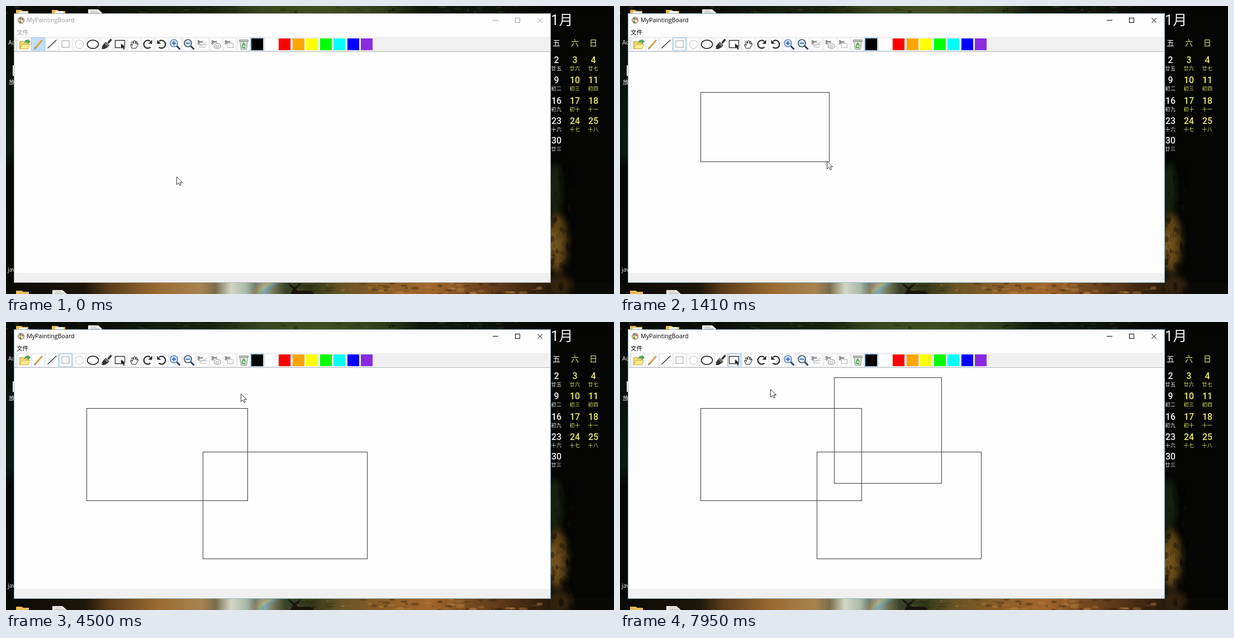
These frames come from a looping animation (1088 px wide and 515 px high, 8000 ms). An HTML page:

```html
<!DOCTYPE html>
<html lang="zh">
<head>
<meta charset="utf-8">
<title>MyPaintingBoard</title>
<style>
html, body { margin: 0; width: 100%; height: 100%; overflow: hidden; background: #060805; }
svg { display: block; width: 1088px; height: 515px; }
text { font-family: "Open Sans", "Noto Sans CJK SC", "Noto Sans CJK", sans-serif; }
.cal text { font-family: Roboto, "Noto Sans CJK SC", "Noto Sans CJK", sans-serif; font-weight: 500; text-anchor: middle; }
.cal .sub { letter-spacing: .5px; font-weight: 400; }
.line { fill: none; stroke: #3a3a3a; stroke-width: 1; shape-rendering: crispEdges; }
#chrome { color: #000; }
#chrome.idle { color: #999; }
</style>
</head>
<body>
<svg viewBox="0 0 1088 515">
  <defs>
    <linearGradient id="top">
      <stop offset="0" stop-color="#060805"/><stop offset=".17" stop-color="#0b0f07"/>
      <stop offset=".25" stop-color="#151d0b"/><stop offset=".34" stop-color="#1a220e"/>
      <stop offset=".42" stop-color="#38451e"/><stop offset=".52" stop-color="#424d22"/>
      <stop offset=".62" stop-color="#323c1a"/><stop offset=".68" stop-color="#12190b"/>
      <stop offset=".8" stop-color="#0d1208"/><stop offset=".9" stop-color="#040503"/>
    </linearGradient>
    <linearGradient id="ground">
      <stop offset="0" stop-color="#0a0a06"/><stop offset=".13" stop-color="#1d160a"/>
      <stop offset=".17" stop-color="#5c3d1b"/><stop offset=".25" stop-color="#9a6a31"/>
      <stop offset=".32" stop-color="#a98350"/><stop offset=".345" stop-color="#7a6d4c"/>
      <stop offset=".37" stop-color="#d3d7c5"/><stop offset=".395" stop-color="#a9b9a8"/>
      <stop offset=".41" stop-color="#70806d"/><stop offset=".425" stop-color="#91a7a3"/>
      <stop offset=".44" stop-color="#747758"/><stop offset=".46" stop-color="#384329"/>
      <stop offset=".5" stop-color="#303718"/><stop offset=".55" stop-color="#665326"/>
      <stop offset=".62" stop-color="#8a5d27"/><stop offset=".7" stop-color="#a2662c"/>
      <stop offset=".76" stop-color="#774a20"/><stop offset=".82" stop-color="#5a3718"/>
      <stop offset=".89" stop-color="#2c1c0c"/><stop offset=".94" stop-color="#080805"/>
    </linearGradient>
    <linearGradient id="side" x2="0" y2="1">
      <stop offset="0" stop-color="#060805"/><stop offset=".2" stop-color="#08100b"/>
      <stop offset=".5" stop-color="#0c1912"/><stop offset=".57" stop-color="#050705"/>
      <stop offset="1" stop-color="#070805"/>
    </linearGradient>
    <filter id="soft" x="-50%" y="-50%" width="200%" height="200%"><feGaussianBlur stdDeviation="6"/></filter>
    <filter id="glow" x="-50%" y="-50%" width="200%" height="200%"><feGaussianBlur stdDeviation="2"/></filter>
    <clipPath id="right"><path d="M975 0H1088V515H975Z"/></clipPath>
  </defs>

  <g id="desktop">
    <path fill="#050604" d="M0 0H1088V515H0Z"/>
    <path fill="url(#top)" d="M0 0H1088V14H0Z"/>
    <path fill="url(#side)" d="M0 0H15V515H0Z"/>
    <path fill="url(#ground)" d="M0 494H1088V515H0Z"/>
    <g clip-path="url(#right)"><g filter="url(#soft)">
      <ellipse cx="982" cy="328" rx="13" ry="48" fill="#18220e"/>
      <ellipse cx="986" cy="424" rx="19" ry="52" fill="#5d4319"/>
      <ellipse cx="980" cy="430" rx="8" ry="28" fill="#7d5a20"/>
      <ellipse cx="990" cy="500" rx="22" ry="20" fill="#33230f"/>
    </g></g>
    <g id="texture"></g>
    <g fill="none" stroke-width="4" opacity=".55" filter="url(#glow)">
      <path d="M442 515Q450 498 470 494" stroke="#d07850"/>
      <path d="M450 515Q460 500 478 494" stroke="#bccc59"/>
      <path d="M459 515Q467 504 486 494" stroke="#51a7d8"/>
    </g>
    <path fill="#1a150c" d="M509 515L514 506 507 500 504 495 511 499 516 503 521 500 528 495 525 501 519 506 522 509H540Q549 509 551 515Z"/>
    <g id="shortcuts">
      <path fill="#e7ba55" d="M18 7H27L30 9H40V14H18ZM82 7H92L95 9H106V14H82ZM18 509H28L31 511H41V515H18Z"/>
      <path fill="#f3f3ed" d="M23 10H38V14H23ZM88 9H103V14H88ZM147 6H165L172 12V14H147ZM83 508H101L109 515H83ZM12 106H15V125H12Z"/>
      <path stroke="#99a0a0" d="M151 9H162M151 12H167M87 511H99M87 514H105"/>
      <g fill="#eee" font-size="10.5"><text x="4" y="69">Ac</text><text x="5" y="140">放</text><text x="3" y="475">jav</text></g>
    </g>
    <g class="cal" id="calendar"></g>
  </g>

  <g id="chrome">
    <path fill="#fdfdfe" d="M14 13H975V494H14Z"/>
    <path fill="#f0f0f0" d="M14 55H975V81H14ZM14 477H975V494H14Z"/>
    <path class="line" style="stroke:#aeb6be" d="M14 81.5H975"/>
    <rect id="frame" class="line" x="14.5" y="13.5" width="960" height="481"/>
    <circle cx="27" cy="25.5" r="5.5" fill="#d8c29d" stroke="#826e58"/>
    <path fill="#477fa9" d="M24 21H27V24H24Z"/><path fill="#d96b3b" d="M28 22H31V25H28Z"/>
    <path fill="#5c944c" d="M24 27H27V30H24Z"/><path fill="#f7e8cc" d="M27 25H30V29H27Z"/>
    <g fill="currentColor"><text x="37" y="29" font-size="10.7">MyPaintingBoard</text><text x="19" y="51" font-size="10.5">文件</text></g>
    <g fill="none" stroke="currentColor">
      <path shape-rendering="crispEdges" d="M871 25.5H881M911.5 21.5H919.5V29.5H911.5Z"/>
      <path d="M951.5 21.5L960 30M960 21.5L951.5 30"/>
    </g>
    <path stroke="#b5b5b5" stroke-dasharray="1 2" d="M18.5 58V79M967 492.5H974M970 489.5H974M973 486.5H974"/>
    <g id="tools"></g>
  </g>
  <g id="boxes"></g>
  <path id="cursor" fill="#fff" stroke="#333" d="M0 0V14L3.3 10.8 5.6 15.6 7.8 14.6 5.6 10H10Z"/>
</svg>

<script>
const $ = id => document.getElementById(id);
const LOOP = 8000, STEP = 70;

// Seeded specks give the wallpaper strips their leafy, grainy look.
let seed = 7;
const random = () => (seed = seed * 16807 % 2147483647) / 2147483647;
const speck = (x, y, w, h, color) =>
  `<ellipse cx="${x}" cy="${y}" rx="${w}" ry="${h}" fill="${color}" opacity="${0.1 + random() * 0.3}"/>`;
let specks = '';
for (let i = 0; i < 70; i++) {
  specks += speck(random() * 970, random() * 13, 2 + random() * 6, 1 + random() * 2, i % 2 ? '#010301' : '#46552a');
  specks += speck(520 + random() * 440, 496 + random() * 19, 2 + random() * 7, 1 + random() * 2, i % 2 ? '#171408' : '#c9924d');
  specks += speck(977 + random() * 40, 290 + random() * 220, 1 + random() * 4, 2 + random() * 6, i % 4 ? '#000' : '#211b0c');
}
$('texture').innerHTML = specks;

const columns = [985, 1018, 1051];
const ink = col => col ? '#e9ea70' : '#f4f4f4';
const label = (x, y, text, size, color, cls = '') =>
  `<text class="${cls}" x="${x}" y="${y}" font-size="${size}" fill="${color}">${text}</text>`;
const weeks = [
  [100, '2 3 4', '廿五 廿六 廿七'], [136, '9 10 11', '初二 初三 初四'],
  [173, '16 17 18', '初九 初十 十一'], [209, '23 24 25', '十六 十七 十八'], [244, '30', '廿三']
];
let calendar = label(995, 34, '1月', 25, '#f4f4f4', 'sub');
[...'五六日'].forEach((day, i) => calendar += label(columns[i], 71, day, 14, ink(i)));
for (const [y, days, lunar] of weeks) {
  days.split(' ').forEach((day, i) => calendar += label(columns[i], y + 1.5, day, 16, ink(i)));
  lunar.split(' ').forEach((day, i) => calendar += label(columns[i], y + 15, day, 9, ink(i), 'sub'));
}
$('calendar').innerHTML = calendar;

// Tool icons, each centred on 0,0.
const path = (d, stroke = '#222', width = 1, fill = 'none') =>
  `<path d="${d}" stroke="${stroke}" stroke-width="${width}" fill="${fill}"/>`;
const oval = (rx, ry, color, width) => `<ellipse rx="${rx}" ry="${ry}" fill="none" stroke="${color}" stroke-width="${width}"/>`;
const turn = path('M5 5A7 7 0 1 1 4.5 -5.5', '#222', 2.2) + path('M8 -8V-1H1Z', 'none', 0, '#222');
const lens = (color, sign) => path('M3 3L9 9', '#28415f', 3) +
  `<circle cx="-2" cy="-2" r="6.5" fill="#e9f2fc" stroke="${color}" stroke-width="1.7"/>` + path(sign, '#3567bb', 2);
const scissors = path('M-8 -6L1 -3M-8 -2L1 -6', '#555') +
  path('M-7 -7A1.5 1.5 0 1 0 -6.9 -7M-7 -3A1.5 1.5 0 1 0 -6.9 -3', '#555');
const icons = [
  path('M-9 8V-5H-3L-1 -3H6V8Z', '#bda03c', 1, '#f1da70') + path('M-9 8L-5 0H9L6 8Z', '#c9aa3c', 1, '#ffec91') +
    path('M-1 -4Q2 -9 6 -7V-9L10 -5 6 -1V-4Q2 -5 -1 -4Z', '#327d37', .6, '#4aa947'),
  path('M-5 6L7 -8', '#edaa4c', 2.6) + path('M-4 7L8 -7', '#8a6038', .8) + path('M-7 9L-6 5 -3.5 7Z', '#554331', .6, '#e9c897'),
  path('M-8 7L8 -8', '#222', 1.2),
  path('M-6.5 -6.5H6.5V5.5H-6.5Z', '#999'),
  oval(7.2, 7.5, '#bbb', 1),
  oval(10, 7.5, '#111', 1.5),
  path('M2 -2L8 -9', '#333', 3.5) + path('M-2 -4L4 2 1 5 -5 -1Z', '#333', 1, '#777') +
    path('M-5 -1L1 5Q-4 9 -9 8L-7 5-9 5Z', '#333', 1, '#333'),
  path('M-9 -7H8V6H-9Z', '#333', 1.4) + path('M1 -2V8L4 6 6 10 8 9 7 5H10Z', '#fff', .6, '#222'),
  path('M-4 7L-7 1Q-6 -1 -3 2L-5 -4Q-3 -6 -2 -3L-1 -1 -1 -6Q1 -8 2 -5V-1L3 -5Q5 -6 5 -3L4 0 6 -2Q8 -1 6 2L3 7Z', '#333', 1.1, '#fff'),
  turn,
  `<g transform="scale(-1 1)">${turn}</g>`,
  lens('#5b83b6', 'M-6 -2H2M-2 -6V2'),
  lens('#394b61', 'M-6 -2H2'),
  scissors + path('M-6 4L8 -4M-7 1H8M-5 5H6', '#999', .8),
  scissors + path('M1 -2L7 0 8 5 3 8 -4 6 -4 1Z', '#888') + path('M-1 2H4V5H-1Z', '#aaa'),
  scissors + `<path d="M-4 -2H6V6H-4Z" fill="none" stroke="#888" stroke-dasharray="2 1"/>`,
  path('M-7 -6H7L5 9H-5Z', '#899489', 1, '#dce4da') + path('M-8 -8H8V-5H-8Z', '#849081', 1, '#bccab8') +
    path('M-3 3L0 -2 3 3M-4 4L-1 6H3', '#4b9b50', 1.8)
];
const swatches = ['#000', '#fff', '#f00', '#ffa500', '#ff0', '#0f0', '#0ff', '#00f', '#8a2be2'];
for (const color of swatches) icons.push(path('M-10.5 -10.5H10.5V10.5H-10.5Z', 'none', 0, color));
$('tools').innerHTML = icons.map((icon, i) => `<g transform="translate(${Math.round(34 + i * 24.48) - .5} 68.5)">
  <path class="choice" d="M-12 -12H12V11H-12Z"/>
  <path class="tile" fill="#fdfdfe" d="M-10.5 -10.5H10.5V10.5H-10.5Z"/>${icon}</g>`).join('');
const choices = [...document.querySelectorAll('.choice')];
const pencilTile = document.querySelectorAll('.tile')[1];

// Pointer path: time, x, y
const track = [
  [0, 305, 305], [70, 305, 305], [210, 210, 190], [350, 112, 90], [490, 108, 68], [700, 108, 68],
  [840, 130, 128], [980, 144, 154], [1120, 220, 192], [1330, 374, 278], [1400, 370, 277], [1470, 370, 277],
  [1680, 432, 319], [2100, 432, 319], [2380, 400, 278], [2660, 355, 235], [2800, 352, 232], [2940, 352, 232],
  [3360, 530, 345], [3780, 646, 423], [4060, 646, 423], [4270, 530, 265], [4480, 420, 128],
  [4760, 383, 99], [4900, 383, 99], [5390, 485, 202], [5880, 575, 288], [6160, 575, 288],
  [6580, 395, 180], [7000, 208, 70], [7350, 205, 69], [7560, 225, 85], [7910, 269, 120], [8000, 269, 120]
];
// Drags: start, end, left, top
const drags = [[980, 1680, 144, 154], [2940, 3780, 352, 232], [4900, 5880, 383, 99]];
$('boxes').innerHTML = drags.map(() => '<rect class="line"/>').join('');
const boxes = [...$('boxes').children];

function pointer(time) {
  const i = Math.max(1, track.findIndex(key => key[0] >= time));
  const [t0, x0, y0] = track[i - 1], [t1, x1, y1] = track[i];
  const part = (time - t0) / (t1 - t0);
  return [x0 + (x1 - x0) * part, y0 + (y1 - y0) * part].map(Math.round);
}

function draw(now) {
  const time = Math.floor(now % LOOP / STEP) * STEP;
  $('cursor').setAttribute('transform', `translate(${pointer(time).map(v => v + .5)})`);
  const active = time >= 560;
  const tool = !active ? 1 : time < 7140 ? 3 : 7;
  $('chrome').setAttribute('class', active ? '' : 'idle');
  $('frame').style.stroke = active ? '#8fb4c4' : '#a9aaa5';
  choices.forEach((choice, i) => {
    const on = i === tool || i === 17;
    choice.setAttribute('fill', on ? '#c5dff3' : 'none');
    choice.setAttribute('stroke', on ? '#9acbe9' : 'none');
  });
  pencilTile.style.display = tool === 1 ? 'none' : '';
  boxes.forEach((box, i) => {
    const [start, end, left, top] = drags[i];
    box.style.display = time > start ? '' : 'none';
    // The outline trails the pointer by one step.
    const [x, y] = pointer(Math.max(start, Math.min(time - STEP, end)));
    const shape = { x: left + .5, y: top + .5, width: Math.max(0, x - left), height: Math.max(0, y - top) };
    for (const name in shape) box.setAttribute(name, shape[name]);
  });
  requestAnimationFrame(draw);
}
requestAnimationFrame(draw);
</script>
</body>
</html>
```
